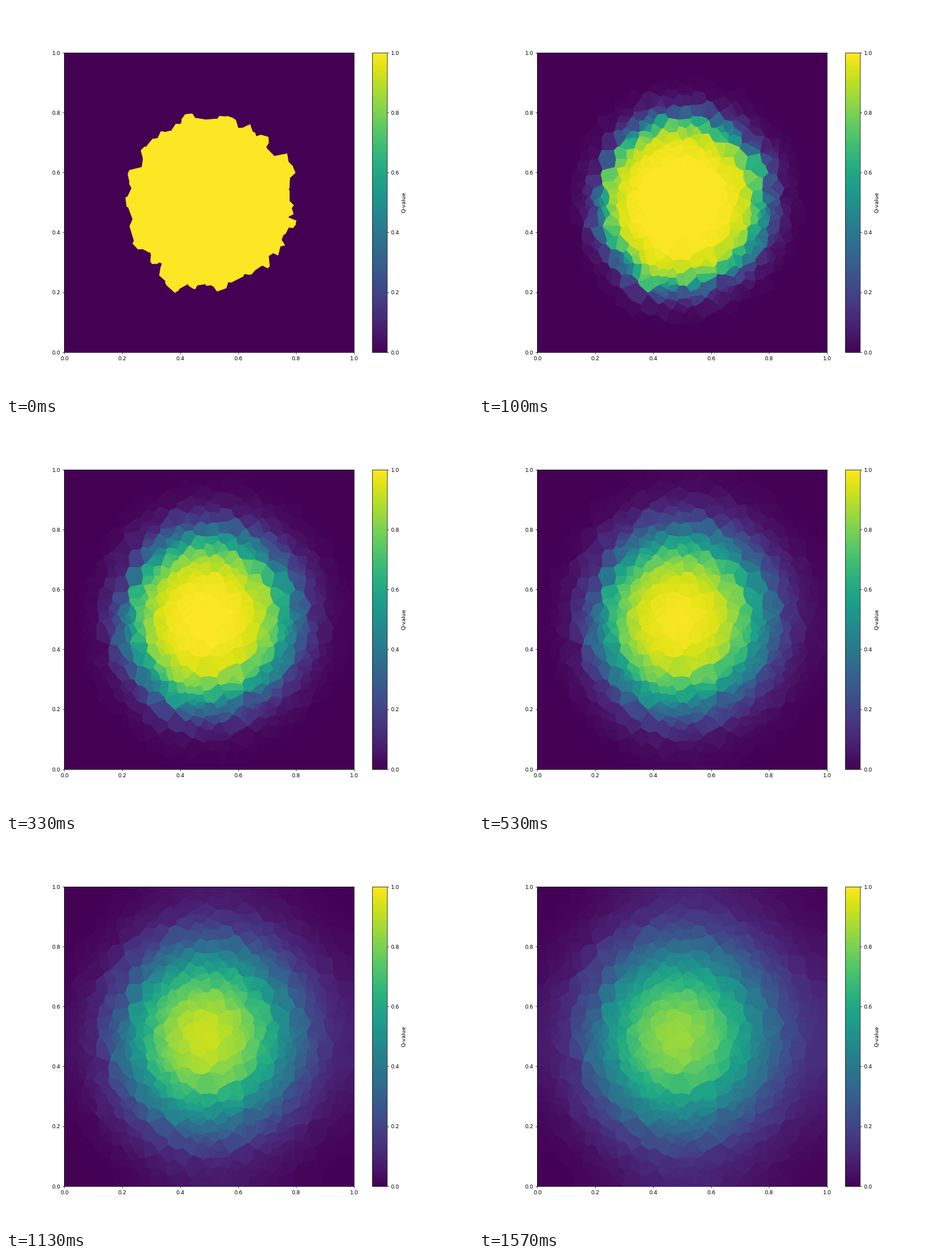
Animation of 820 by 683 pixels, one loop 1.66 s. Source, as a matplotlib script:

```python
import numpy as np
import matplotlib.pyplot as plt
from matplotlib.animation import FuncAnimation
from matplotlib.collections import PolyCollection
from matplotlib.tri import Triangulation

TICK = 10                # ms per drawn frame
LOOP = 1660              # ms
SITES = 1000
CENTER, RADIUS = (0.503, 0.5), 0.286
DIFFUSION = 2.2e-4       # diffusivity times one solver step
HEAD_START = 2           # extra solver steps before the first soft picture

# Solver steps that are shown, ever sparser; each stays until the next is due.
SHOWN = [*range(13), *range(14, 29, 2),
         *(28 + round(2.75 * i) for i in range(1, 8))]


def mirror(sites, reach=0.2):
    """Add reflected sites so that the cells end on the unit square."""
    parts = [sites]
    for axis in (0, 1):
        for wall in (0, 1):
            near = sites[np.abs(sites[:, axis] - wall) < reach]
            near[:, axis] = 2 * wall - near[:, axis]
            parts.append(near)
    return np.vstack(parts)


def circumcenters(a, b, c):
    b, c = b - a, c - a
    d = 2 * (b[:, 0] * c[:, 1] - b[:, 1] * c[:, 0])
    bb, cc = (b ** 2).sum(1), (c ** 2).sum(1)
    x = (c[:, 1] * bb - b[:, 1] * cc) / d
    y = (b[:, 0] * cc - c[:, 0] * bb) / d
    return a + np.column_stack([x, y])


def voronoi(sites):
    """Return cell polygons, their areas and the face conductances."""
    n = len(sites)
    pts = mirror(sites)
    mesh = Triangulation(*pts.T)
    tris = mesh.triangles
    centers = circumcenters(*(pts[tris[:, k]] for k in range(3)))

    fans = [[] for _ in range(n)]
    for t, tri in enumerate(tris):
        for v in tri:
            if v < n:
                fans[v].append(t)
    cells, areas = [], []
    for site, fan in zip(sites, fans):
        rel = centers[fan] - site
        rel = rel[np.argsort(np.arctan2(rel[:, 1], rel[:, 0]))]
        x, y = rel.T
        areas.append((x * np.roll(y, -1) - y * np.roll(x, -1)).sum() / 2)
        cells.append(rel + site)

    faces = np.zeros((n, n))
    for k in range(3):
        a, b, other = tris[:, k], tris[:, (k + 1) % 3], mesh.neighbors[:, k]
        keep = (a < n) & (b < n) & (other >= 0)
        a, b = a[keep], b[keep]
        face = np.hypot(*(centers[keep] - centers[other[keep]]).T)
        gap = np.hypot(*(pts[a] - pts[b]).T)
        # slightly faster spreading towards the right
        speed = 1 + 0.6 * ((pts[a, 0] + pts[b, 0]) / 2 - 0.5)
        faces[a, b] = faces[b, a] = speed * face / gap
    return cells, np.array(areas), faces


def diffuse(start, areas, faces, steps):
    flow = (np.diag(faces.sum(1)) - faces) / areas[:, None]
    advance = np.linalg.inv(np.eye(len(start)) + DIFFUSION * flow)
    states = [start]
    for _ in range(steps):
        states.append(advance @ states[-1])
    return states


sites = np.random.default_rng(7).random((SITES, 2))
cells, areas, faces = voronoi(sites)
hot = np.hypot(*(sites - CENTER).T) < RADIUS
states = diffuse(hot.astype(float), areas, faces, SHOWN[-1] + HEAD_START)

fig, ax = plt.subplots(figsize=(12, 10), dpi=68.34)
fig.subplots_adjust(left=0.12495)
field = PolyCollection(cells, array=states[0], cmap="viridis",
                       edgecolors="face", linewidths=1)
field.set_clim(0, 1)
ax.add_collection(field)
ax.set(xlim=(0, 1), ylim=(0, 1), facecolor=plt.cm.viridis(0.0))
fig.colorbar(field, ax=ax, label="Q-value")


def draw(i):
    step = (3 * TICK * i + 15) // 100      # 30 solver steps per second
    step = max(s for s in SHOWN if s <= step)
    field.set_array(states[step + HEAD_START if step else 0])
    return field,


anim = FuncAnimation(fig, draw, frames=LOOP // TICK, interval=TICK,
                     repeat=True, repeat_delay=0)
plt.show()
```
